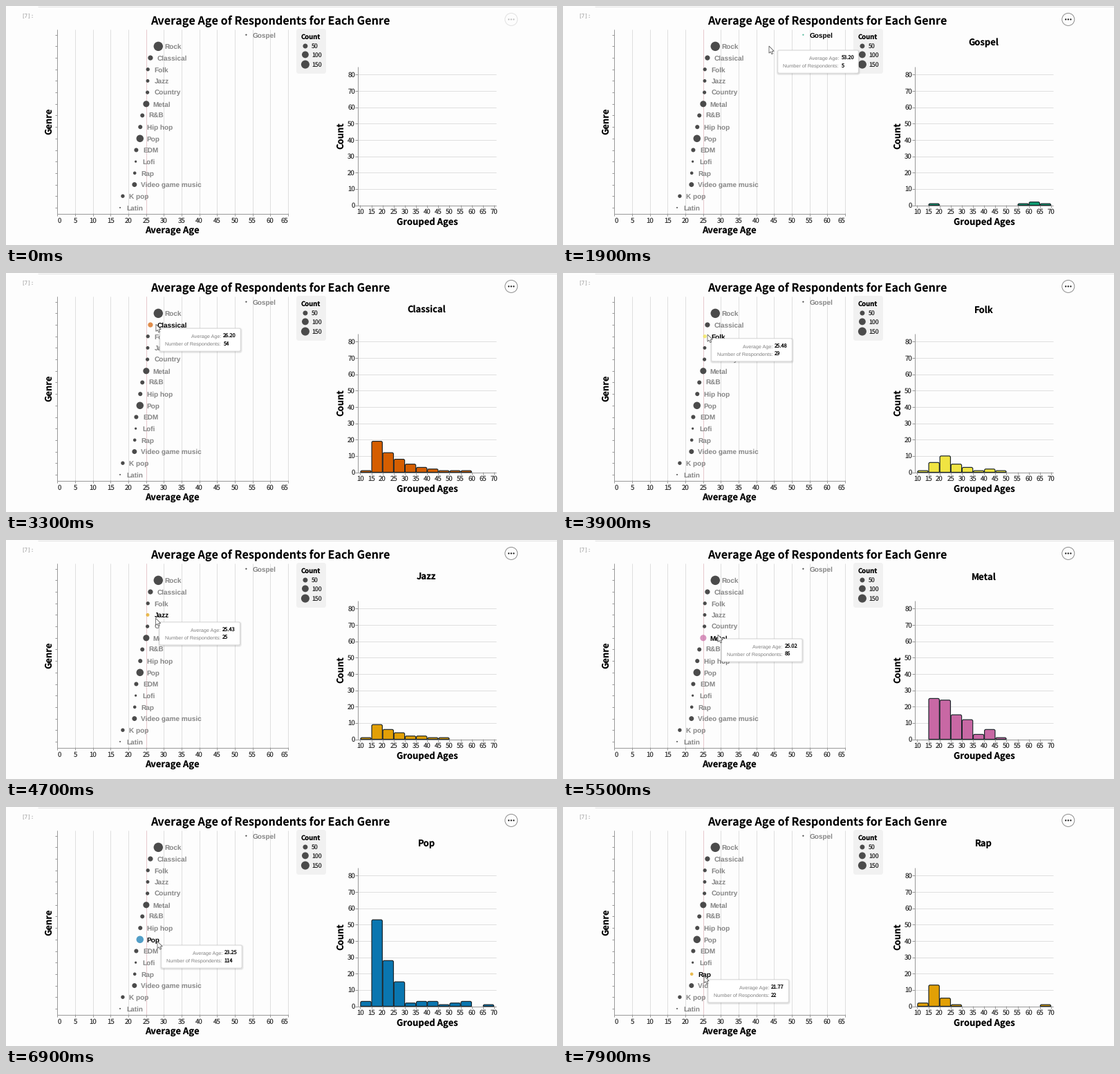
A matplotlib script that plays this animation: 797 by 346 pixels, repeating every 8 s.

```python
import numpy as np
import matplotlib.pyplot as plt
from matplotlib.animation import FuncAnimation
from matplotlib.patches import Circle, FancyBboxPatch, PathPatch, Polygon
from matplotlib.path import Path
from matplotlib.transforms import Affine2D

plt.rcParams["text.hinting"] = "none"

W, H, DPI = 797, 346, 100
PX = 72 / DPI
UI, ARIAL, MONO = "Noto Sans CJK JP", "Liberation Sans", "DejaVu Sans Mono"
PAPER, GREY, DARK = "#fdfdfd", "#868686", "#4b4b4b"
AXIS, GRID = "#999999", "#dfdfdf"
PALETTE = ["#0d9e72", "#0a76b0", "#d55e00", "#f0e442",
           "#e2a006", "#56b4e9", "#c868a4", "#999999"]

# genre: (average age, respondents)
GENRES = {
    "Gospel": (53.20, 5), "Rock": (28.42, 188), "Classical": (26.2, 54),
    "Folk": (25.48, 29), "Jazz": (25.43, 25), "Country": (25.36, 28),
    "Metal": (25.02, 86), "R&B": (23.92, 37), "Hip hop": (23.34, 38),
    "Pop": (23.25, 114), "EDM": (22.2, 38), "Lofi": (22.05, 11),
    "Rap": (21.77, 22), "Video game music": (21.7, 50),
    "K pop": (18.4, 30), "Latin": (17.64, 4),
}
# respondents per five-year group from age 10; others follow a decay
COUNTS = {
    "Gospel": [0, 1] + [0] * 7 + [1, 2, 1],
    "Rock": [4, 52, 46, 24, 22, 8, 8, 2, 3, 5, 10, 4],
    "Folk": [1, 6, 10, 5, 3, 1, 2, 1],
    "Metal": [0, 25, 24, 15, 12, 3, 6, 1],
    "Pop": [3, 53, 28, 15, 2, 3, 3, 1, 2, 3, 0, 1],
    "Rap": [2, 13, 5, 1] + [0] * 7 + [1],
}
# pointer stops: step, x, y
STOPS = np.array([
    (8, 795, 150), (16, 425, 55), (19, 298, 58), (23, 224, 62),
    (28, 223.5, 62), (39, 209, 89), (55, 224, 137.3), (69, 219, 194.5),
    (79, 204, 244.5)])

names = list(GENRES)
ages, sizes = np.array(list(GENRES.values())).T
dot_x = 74.5 + 5.13 * ages
dot_y = 41.7 + 16.68 * np.arange(len(names))


def group_x(age):
    return 512.4 + 3.225 * (age - 10)


def count_y(n):
    return 288.5 - 2.363 * n


def radius(n):
    return 0.49 * np.sqrt(n)


def group_counts(k):
    if names[k] in COUNTS:
        return COUNTS[names[k]]
    decay = 0.36 * 0.64 ** np.arange(11)
    return [1] + list(np.round(sizes[k] * decay).astype(int))


fig = plt.figure(figsize=(W / DPI, H / DPI), dpi=DPI, facecolor=PAPER)
ax = fig.add_axes([0, 0, 1, 1])
ax.set_xlim(0, W)
ax.set_ylim(H, 0)
ax.axis("off")


def line(x0, y0, x1, y1, color=AXIS, z=1):
    ax.plot([x0, x1], [y0, y1], color=color, lw=PX, zorder=z,
            solid_capstyle="butt")


def text(x, y, s, size, color="black", font=UI, bold=False, ha="center",
         z=5, **kw):
    return ax.text(x, y, s, fontsize=size * PX, color=color, family=font,
                   weight="bold" if bold else "normal", ha=ha,
                   va="baseline", zorder=z, **kw)


def side_title(x, y, s):
    text(x, y, s, 13, bold=True, rotation=90, rotation_mode="anchor")


def dot(x, y, r):
    return ax.add_patch(Circle((x, y), r, fc=DARK, ec="none", zorder=4))


def box(x, y, w, h, pad, z, **kw):
    return ax.add_patch(FancyBboxPatch(
        (x + pad, y + pad), w - 2 * pad, h - 2 * pad,
        boxstyle=f"round,pad={pad}", zorder=z, **kw))


# page
line(46, 0.5, W, 0.5, "#e2e2e2")
text(31.5, 17.3, "[7]:", 7.6, "#9a9a9a", MONO)
text(382, 26.8, "Average Age of Respondents for Each Genre", 16.2, bold=True)

# left chart
for age in range(0, 66, 5):
    x = 74.5 + 5.13 * age
    line(x, 34, x, 300, GRID)
    line(x, 300, x, 304)
    text(np.clip(x, 77, 402.5), 313.8, str(age), 9.7, "#333333")
line(74.5, 34, 74.5, 300.5, z=2)
line(74, 300.5, 408, 300.5, z=2)
line(203, 34, 203, 300, "#e8c9cd", z=2)
text(241, 329.7, "Average Age", 13, bold=True)
side_title(66.3, 167, "Genre")

dots, labels = [], []
for name, x, y, n in zip(names, dot_x, dot_y, sizes):
    line(71, y, 74.5, y)
    dots.append(dot(x, y, radius(n)))
    labels.append(text(x + 9.5, y + 3.8, name, 9.95, GREY, ARIAL, True,
                       ha="left"))

# legend
box(420, 33, 43, 65, 4, 1, fc="#f1f1f1", ec="none")
text(427, 48.2, "Count", 9.5, bold=True, ha="left")
for n, y in ((50, 58), (100, 70.4), (150, 84.6)):
    dot(432.9, y, radius(n))
    text(442, y + 3.3, str(n), 8.8, "#222222", ha="left")

# right chart
for n in range(0, 81, 10):
    y = count_y(n)
    line(509, y, 709, y, GRID)
    line(505.5, y, 509, y)
    text(505, y + 3.5, str(n), 9.7, "#333333", ha="right")
for age in range(10, 71, 5):
    x = group_x(age)
    line(x, 288, x, 291.5)
    text(x, 300.9, str(age), 9.7, "#333333")
line(509, 88, 509, 288.5, z=2)
line(509, 288.5, 709, 288.5, z=2)
text(609, 316.7, "Grouped Ages", 13, bold=True)
side_title(488.3, 188, "Count")
genre_title = text(608.5, 57.6, "", 13, bold=True)


def bar_path(i, n):
    x0, x1 = group_x(10 + 5 * i) + 0.5, group_x(15 + 5 * i) - 0.3
    y0, y1, r = count_y(0), count_y(n), 2
    pts = [(x0, y0), (x0, y1 + r), (x0, y1), (x0 + r, y1),
           (x1 - r, y1), (x1, y1), (x1, y1 + r), (x1, y0), (x0, y0)]
    codes = [Path.MOVETO, Path.LINETO, Path.CURVE3, Path.CURVE3, Path.LINETO,
             Path.CURVE3, Path.CURVE3, Path.LINETO, Path.CLOSEPOLY]
    return Path(pts, codes)


bars = [ax.add_patch(PathPatch(bar_path(i, 1), ec="#1c262b", lw=1.2 * PX,
                               zorder=3, snap=False)) for i in range(12)]

# menu button
menu_ring = ax.add_patch(Circle((730.8, 19.4), 9, fc=PAPER, lw=PX, zorder=3))
menu_dots = [dot(730.8 + dx, 19.4, 1.15) for dx in (-3.6, 0, 3.6)]

# tooltip and pointer, each moved by its own offset
tip_shift, mouse_shift = Affine2D(), Affine2D()
tip_tr = tip_shift + ax.transData
tip = [box(-g, 1 - g, 117 + 2 * g, 33 + 2 * g, 2 + g, 8, fc="black",
           ec="none", alpha=0.06, transform=tip_tr) for g in (1, 2)]
tip.append(box(0, 0, 116.5, 33, 2, 9, fc="white", ec="#d4d4d4",
               lw=0.8 * PX, transform=tip_tr))
values = []
for y, key in ((14.2, "Average Age:"), (24.8, "Number of Respondents:")):
    tip.append(text(88.3, y, key, 7.3, "#808080", ARIAL, ha="right", z=10,
                    transform=tip_tr))
    values.append(text(91.3, y, "", 7.5, "black", ha="left", z=10,
                       transform=tip_tr))
tip += values

arrow = [(0, 0), (0, 10.2), (2.3, 8.2), (3.9, 11.7), (5.6, 10.9),
         (4.1, 7.6), (7.2, 7.3)]
mouse = ax.add_patch(Polygon(arrow, fc="white", ec="#555555", lw=0.8 * PX,
                             zorder=12,
                             transform=mouse_shift + ax.transData))


def pointer(step):
    return [np.interp(step, STOPS[:, 0], STOPS[:, k]) for k in (1, 2)]


def draw(step):
    x, y = pointer(step)
    inside = step >= 8
    mouse.set_visible(inside)
    mouse_shift.clear().translate(x, y)
    menu_ring.set_edgecolor("#8f8f8f" if inside else "#e2e2e2")
    for d in menu_dots:
        d.set_facecolor("#222222" if inside else "#c4c4c4")

    # the dot nearest to the pointer is selected
    pick = None
    if inside and x < 408:
        pick = int(np.argmin(np.hypot(dot_x - x, dot_y - y)))
    for k, (d, label) in enumerate(zip(dots, labels)):
        d.set_facecolor((PALETTE[k % 8], 0.7) if k == pick else DARK)
        label.set_color("black" if k == pick else GREY)

    picked = pick is not None
    counts = group_counts(pick) if picked else []
    genre_title.set_text(names[pick] if picked else "")
    for i, bar in enumerate(bars):
        n = counts[i] if i < len(counts) else 0
        bar.set_visible(n > 0)
        if n:
            bar.set_path(bar_path(i, n))
            bar.set_facecolor(PALETTE[pick % 8])

    for part in tip:
        part.set_visible(picked)
    if picked:
        tx, ty = pointer(step - 0.17)  # the tooltip trails a little
        tip_shift.clear().translate(tx + 5.6, ty + 6.3)
        values[0].set_text(f"{ages[pick]:.2f}")
        values[1].set_text(f"{sizes[pick]:.0f}")
    return []


anim = FuncAnimation(fig, draw, frames=80, init_func=lambda: draw(0),
                     interval=100, repeat=True, repeat_delay=0, blit=False)
plt.show()
```
